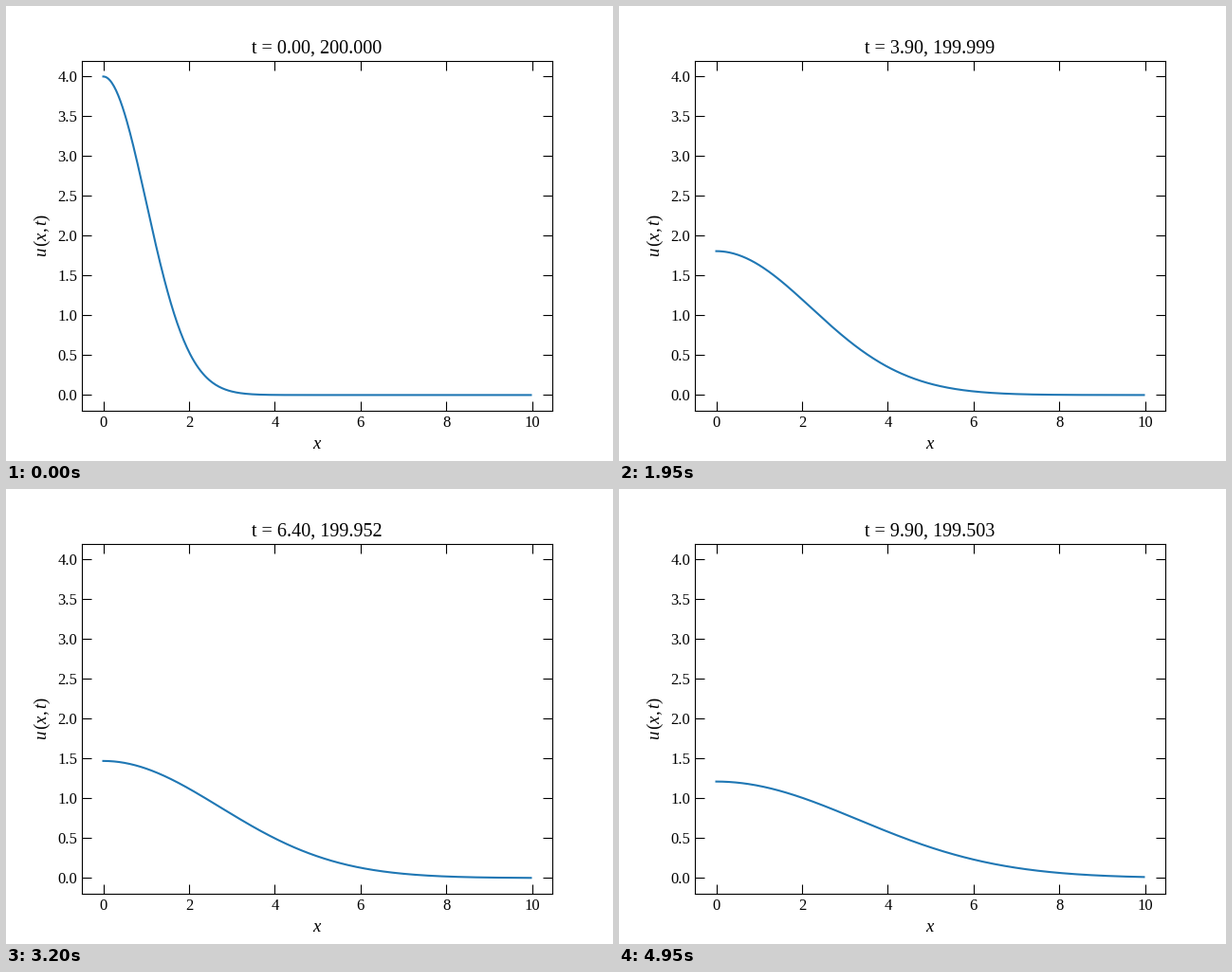
A matplotlib script for the animation above (5 s loop, 640 by 480 pixels).

```python
import math

import numpy as np
import matplotlib.pyplot as plt
from matplotlib.animation import FuncAnimation

FRAMES, INTERVAL = 100, 50
DT = 0.1
DX = 0.025
PEAK = 4.0
TOTAL = 200.0

plt.rcParams.update({
    "font.family": "Liberation Serif",
    "font.size": 12,
    "mathtext.fontset": "custom",
    "mathtext.rm": "Liberation Serif",
    "mathtext.it": "Liberation Serif:italic",
    "axes.titlesize": 14.5,
    "axes.labelsize": 13.5,
})

x = DX * np.arange(400)


def density(t):
    """Spreading Gaussian whose variance grows as 1 + t."""
    var = 1 + t
    return PEAK / math.sqrt(var) * np.exp(-x**2 / (2 * var))


def mass(t):
    """Amount still inside the grid, up to half a cell past its last point."""
    edge = x[-1] + DX / 2
    return TOTAL * math.erf(edge / math.sqrt(2 * (1 + t)))


def caption(t):
    return f"t = {t:.2f}, {mass(t):.3f}"


fig, ax = plt.subplots(figsize=(6.4, 4.8), dpi=100)
line, = ax.plot(x, density(0), color="tab:blue", lw=1.5)
title = ax.set_title(caption(0))
ax.set_xlabel("$x$")
ax.set_ylabel(r"$u\,(x,t)$")
ax.set_xlim(-0.05 * x[-1], 1.05 * x[-1])
ax.set_ylim(-0.05 * PEAK, 1.05 * PEAK)
ax.set_xticks(range(0, 11, 2))
ax.set_yticks(np.arange(0, 4.1, 0.5))
ax.tick_params(direction="in", length=7, width=0.8, top=True, right=True)


def update(i):
    t = i * DT
    line.set_ydata(density(t))
    title.set_text(caption(t))
    return line, title


anim = FuncAnimation(fig, update, frames=FRAMES, interval=INTERVAL,
                     repeat=True, repeat_delay=0, blit=False)
plt.show()
```
